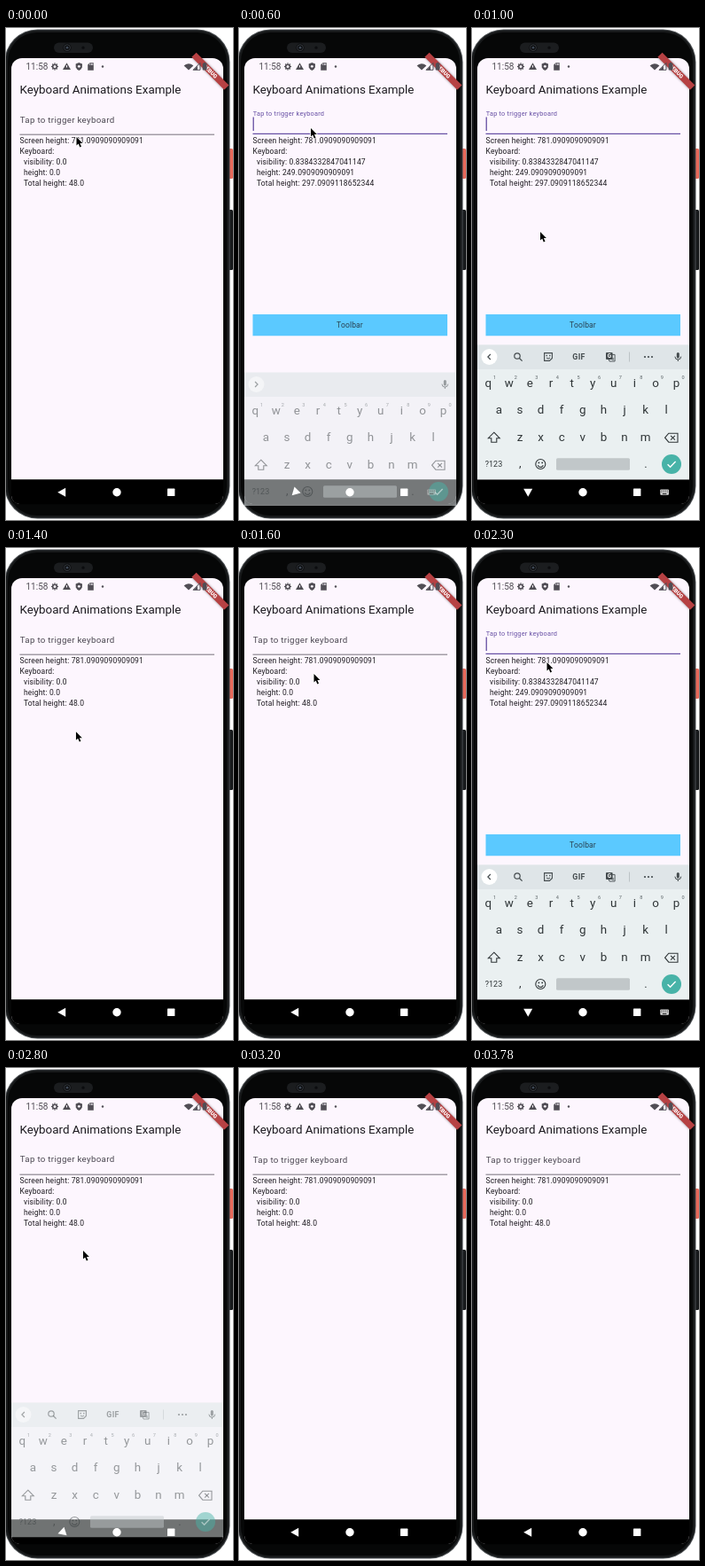
Write an HTML page with a canvas that moves like this. It is 256 by 555 pixels and loops after 3970 ms.

```html
<!DOCTYPE html>
<html lang="en">
<head>
<meta charset="utf-8">
<title>Keyboard Animations Example</title>
<style>
html, body { margin: 0; width: 100%; height: 100%; overflow: hidden; background: #fff; }
canvas { display: block; width: 256px; height: 555px; }
</style>
</head>
<body>
<canvas id="stage"></canvas>
<script>
const W = 256, H = 555, LOOP = 3970, STEP = 100;
const canvas = document.getElementById('stage');
const ctx = canvas.getContext('2d');
const dpr = window.devicePixelRatio || 1;
canvas.width = W * dpr;
canvas.height = H * dpr;

const FONT = 'Roboto, "Noto Sans", sans-serif';
const INK = '#1d1b20', PURPLE = '#6750a4', KEY = '#2f3537', ICON = '#444b4e';
const SESSIONS = [{ show: 600, hide: 1300 }, { show: 1900, hide: 2800 }];
const POINTER = [
  [0, 79.5, 123], [400, 81, 113], [700, 81, 113], [1000, 77, 230], [1300, 77, 230],
  [1600, 84.5, 142], [1700, 84.5, 129], [2400, 84.5, 129], [2700, 87, 206], [3000, 87, 206], [3100, 83, 18]
];
const POINTER_END = 3200;

const clamp = (v, a = 0, b = 1) => Math.max(a, Math.min(b, v));

function rect(x, y, w, h, fill, r = 0) {
  ctx.fillStyle = fill;
  ctx.beginPath();
  ctx.roundRect(x, y, w, h, r);
  ctx.fill();
}

function disc(x, y, r, fill) {
  ctx.fillStyle = fill;
  ctx.beginPath();
  ctx.arc(x, y, r, 0, Math.PI * 2);
  ctx.fill();
}

function ring(x, y, r, color, width = 1) {
  ctx.strokeStyle = color;
  ctx.lineWidth = width;
  ctx.beginPath();
  ctx.arc(x, y, r, 0, Math.PI * 2);
  ctx.stroke();
}

// Traces "x,y x,y ..." relative to an origin.
function trace(points, x, y) {
  ctx.beginPath();
  for (const p of points.split(' ')) {
    const [px, py] = p.split(',').map(Number);
    ctx.lineTo(x + px, y + py);
  }
}

function shape(points, x, y, fill) {
  trace(points, x, y);
  ctx.closePath();
  ctx.fillStyle = fill;
  ctx.fill();
}

function line(points, x, y, color, width = 1, close = false) {
  trace(points, x, y);
  if (close) ctx.closePath();
  ctx.strokeStyle = color;
  ctx.lineWidth = width;
  ctx.stroke();
}

function text(str, x, y, size, color, { align = 'left', space = 0, weight = 400 } = {}) {
  ctx.font = `${weight} ${size}px ${FONT}`;
  ctx.letterSpacing = space + 'px';
  ctx.textAlign = align;
  ctx.fillStyle = color;
  ctx.fillText(str, x, y);
}

function keyboardAt(t) {
  const off = { focused: false, alpha: 0, shift: 0, turn: 0, tools: 0, labelY: 106.5 };
  for (const { show, hide } of SESSIONS) {
    if (t >= show && t < hide) {
      const d = t - show;
      return {
        focused: true,
        alpha: clamp(0.5 + d / 150),
        shift: 31 * clamp(1 - d / 120) ** 2,
        turn: clamp(0.5 + d / 200),
        tools: clamp(d / 200)
      };
    }
    if (t >= hide && t < hide + STEP) {
      return { focused: false, alpha: 0.48, shift: 20, turn: 0.2, tools: 1, labelY: 105.5 };
    }
  }
  return off;
}

function drawPhone() {
  rect(0, 0, W, H, '#fff');
  rect(250, 136, 6, 34, '#e8695a', 1.5);
  rect(250, 205, 6, 68, '#17191b', 1.5);
  rect(-1.5, 1.5, 254, 552, '#4b4f52', 37);
  rect(-0.5, 2.5, 252, 550, '#17191a', 36);
  rect(2, 5, 247, 545, '#060707', 33);
  rect(54, 16.5, 44, 11.5, '#1b1d1f', 5.7);
  disc(69, 22.2, 4.6, '#0b0c0e');
  ring(69, 22.2, 3.4, '#34383d', 1);
  disc(69, 22.2, 1.4, '#3d4653');
  disc(87, 22.2, 1.6, '#0b0c0e');
}

function drawBanner() {
  ctx.save();
  ctx.translate(245, 34);
  ctx.rotate(Math.PI / 4);
  ctx.shadowColor = 'rgba(0,0,0,.45)';
  ctx.shadowBlur = 3 * dpr;
  rect(-26, 17, 52, 7.4, '#b64143');
  ctx.shadowColor = 'transparent';
  text('DEBUG', 0, 22.9, 6.2, '#fff', { align: 'center', weight: 900 });
  ctx.restore();
}

function drawStatus() {
  const c = '#514e55';
  text('11:58', 22.5, 47.3, 10, c);
  ring(55, 43.5, 2.3, c, 1.6);
  for (let i = 0; i < 8; i++) {
    const a = i * Math.PI / 4;
    disc(55 + 3.4 * Math.cos(a), 43.5 + 3.4 * Math.sin(a), 0.75, c);
  }
  shape('0,-4.3 4.5,3.6 -4.5,3.6', 68.5, 43.5, c);
  rect(68, 42, 1, 2.6, '#fef7ff');
  shape('0,-4.5 3.7,-3 3.5,1 2,3.2 0,4.5 -2,3.2 -3.5,1 -3.7,-3', 82.3, 43.5, c);
  disc(82.3, 43.3, 1.4, '#fef7ff');
  shape('-1,-4.3 3.3,-4.3 3.3,4.3 -3.3,4.3 -3.3,-2', 95.5, 43.5, c);
  for (let i = 0; i < 3; i++) rect(94.5 + i * 1.5, 40, 0.7, 2, '#fef7ff');
  disc(109, 43.5, 1.2, c);
  ctx.fillStyle = c;
  ctx.beginPath();
  ctx.moveTo(206, 47.6);
  ctx.arc(206, 47.6, 7.4, -Math.PI * 0.76, -Math.PI * 0.24);
  ctx.fill();
  line('-4,4 4,4 4,-4', 215, 43.3, c, 1, true);
  shape('-3.6,4 1,4 1,-.6', 215, 43.3, c);
  rect(221.7, 39.8, 4.8, 7.8, c, 0.8);
  rect(223, 38.9, 2.2, 1.4, c);
}

function drawApp(kb) {
  rect(6, 34, 239, 503, '#fdf6fe', [12, 12, 10, 10]);
  drawBanner();
  drawStatus();
  text('Keyboard Animations Example', 15.5, 73.7, 13.4, INK);

  const hint = 'Tap to trigger keyboard';
  if (kb.focused) {
    text(hint, 15.7, 98.6, 7.35, PURPLE, { space: 0.23 });
    rect(15.6, 100.5, 1.3, 15.5, PURPLE);
    rect(15.5, 118.7, 219.5, 1.4, PURPLE);
  } else {
    text(hint, 15.7, kb.labelY, 9.75, '#4b4751', { space: 0.3 });
    rect(15.5, 119.7, 219.5, 0.8, '#49454f');
  }

  const [visible, height, total] = kb.focused
    ? ['0.8384332847041147', '249.0909090909091', '297.0909118652344']
    : ['0.0', '0.0', '48.0'];
  [
    'Screen height: 781.0909090909091',
    'Keyboard:',
    '  visibility: ' + visible,
    '  height: ' + height,
    '  Total height: ' + total
  ].forEach((s, i) => text(s, 15.5, 129.8 + i * 12.15, 8.53, INK, { space: 0.15 }));

  if (kb.focused) {
    rect(15.5, 323, 219.5, 24.3, '#5bc9ff');
    text('Toolbar', 125, 338.4, 8.53, '#29424f', { align: 'center', space: 0.15 });
  }
  rect(6, 509.3, 239, 28, '#000', [0, 0, 10, 10]);
}

function drawTools(y, shown) {
  rect(6, 357.5, 239, 27.5, '#dfe5e8');
  disc(19.5, y, 9, '#fff');
  const dir = shown > 0.4 ? 1 : -1;
  line(`${dir * 1.4},-3 ${dir * -1.6},0 ${dir * 1.4},3`, 19.5, y, ICON, 1.2);

  ctx.save();
  ctx.globalAlpha *= shown;
  ring(51, y - 1, 3.2, ICON, 1.2);
  line('0,0 3.4,3.4', 53.2, y + 1.2, ICON, 1.3);
  line('-4.4,-4.4 4.4,-4.4 4.4,1.4 1.4,4.4 -4.4,4.4', 86, y, ICON, 1.1, true);
  disc(84.2, y - 1.4, 0.8, ICON);
  disc(87.8, y - 1.4, 0.8, ICON);
  line('-2,1 0,2.1 2,1', 86, y, ICON, 1);
  text('GIF', 120.5, y + 3.2, 8.8, ICON, { align: 'center', weight: 700, space: 0.3 });
  rect(151, y - 5, 7.6, 8, ICON, 1);
  text('G', 154.8, y + 1.3, 6.3, '#fff', { align: 'center', weight: 700 });
  line('-1,-2.6 4.8,-2.6 4.8,5 -1.3,5 -2,3', 156.3, y, ICON, 0.9);
  text('x', 159, y + 3.9, 5.4, ICON, { align: 'center' });
  rect(177, y - 5.5, 0.8, 11, '#b3babd');
  for (let i = -1; i < 2; i++) disc(199 + i * 4, y, 1.1, ICON);
  ctx.restore();

  rect(230.8, y - 5, 3, 6.4, ICON, 1.5);
  ctx.strokeStyle = ICON;
  ctx.lineWidth = 1;
  ctx.beginPath();
  ctx.arc(232.3, y - 0.4, 3.4, 0, Math.PI);
  ctx.stroke();
  line('0,3 0,5', 232.3, y, ICON, 1);
}

function drawKeyRow(letters, x, y) {
  [...letters].forEach((ch, i) => text(ch, x + i * 23.6, y, 13.4, KEY, { align: 'center' }));
}

function drawKeyboard({ alpha, shift, tools }) {
  ctx.save();
  ctx.beginPath();
  ctx.rect(6, 340, 239, 199);
  ctx.clip();
  ctx.globalAlpha = alpha;
  ctx.translate(0, shift);
  rect(6, 357.5, 239, 151.8, '#eaf0f1');
  drawTools(371, tools);

  drawKeyRow('qwertyuiop', 18.2, 404.6);
  [...'1234567890'].forEach((n, i) => text(n, 25.6 + i * 23.6, 396, 5.6, '#5d6568', { align: 'center' }));
  drawKeyRow('asdfghjkl', 30.4, 435.2);
  drawKeyRow('zxcvbnm', 54, 465.8);

  line('0,-6 6.4,.5 3,.5 3,5 -3,5 -3,.5 -6.4,.5', 24.8, 462.2, KEY, 1.1, true);
  line('-7.4,0 -3.2,-5 7,-5 7,5 -3.2,5', 225, 462.2, KEY, 1.1, true);
  line('-2.4,-2.4 2.4,2.4', 226.5, 462.2, KEY, 1.1);
  line('2.4,-2.4 -2.4,2.4', 226.5, 462.2, KEY, 1.1);

  text('?123', 24.5, 495.3, 9, KEY, { align: 'center' });
  text(',', 54.3, 494.8, 13, KEY, { align: 'center' });
  ring(77.3, 492, 5.5, KEY, 1.1);
  disc(75.4, 490.4, 0.9, KEY);
  disc(79.2, 490.4, 0.9, KEY);
  ctx.lineWidth = 1.1;
  ctx.beginPath();
  ctx.arc(77.3, 492.4, 3, 0.25, Math.PI - 0.25);
  ctx.stroke();
  rect(95, 485.3, 83, 13.4, '#c1c7c9', 1.5);
  text('.', 196, 495.5, 13, KEY, { align: 'center' });
  disc(225, 492, 11, '#48b3a8');
  line('-4.4,.2 -1.4,3.2 4.6,-3', 225, 492, '#fff', 1.4);
  ctx.restore();
}

function drawNav({ turn, focused }) {
  const y = 523.8;
  ctx.save();
  ctx.translate(63.2, y);
  ctx.rotate(-turn * Math.PI / 2);
  shape('-5,0 4,-5 4,5', 0, 0, '#fff');
  ctx.restore();
  disc(125, y, 4.7, '#fff');
  rect(182, y - 4.2, 8.4, 8.4, '#fff', 0.6);
  if (!focused) return;
  ctx.save();
  ctx.globalAlpha = turn;
  rect(212.3, y - 3.3, 9.6, 6.2, '#dcdcdc', 0.8);
  for (let i = 0; i < 8; i++) rect(213.4 + (i % 4) * 2.1, y - 2.2 + (i >> 2) * 1.8, 1, 0.9, '#000');
  rect(214.8, y + 1.4, 4.6, 0.8, '#000');
  ctx.restore();
}

function drawPointer(t) {
  if (t >= POINTER_END) return;
  const n = POINTER.findIndex(p => p[0] > t);
  const [t1, x1, y1] = n < 0 ? POINTER[POINTER.length - 1] : POINTER[n];
  const [t0, x0, y0] = n < 0 ? [t1 - 1, x1, y1] : POINTER[n - 1];
  const u = clamp((t - t0) / (t1 - t0));
  const k = u * u * (3 - 2 * u);
  const x = x0 + (x1 - x0) * k, y = y0 + (y1 - y0) * k;
  const arrow = '0,0 0,9.6 2.2,7.6 3.8,11.4 5.5,10.7 3.9,7 6.9,7';
  ctx.lineJoin = 'round';
  line(arrow, x, y, '#fff', 1.4, true);
  shape(arrow, x, y, '#000');
  ctx.lineJoin = 'miter';
}

function draw(t) {
  const kb = keyboardAt(t);
  ctx.setTransform(dpr, 0, 0, dpr, 0, 0);
  drawPhone();
  drawApp(kb);
  if (kb.alpha > 0) drawKeyboard(kb);
  drawNav(kb);
  drawPointer(t);
}

const start = performance.now();
function tick() {
  const t = (performance.now() - start) % LOOP;
  draw(Math.floor(t / STEP) * STEP);
  requestAnimationFrame(tick);
}
tick();
</script>
</body>
</html>
```
